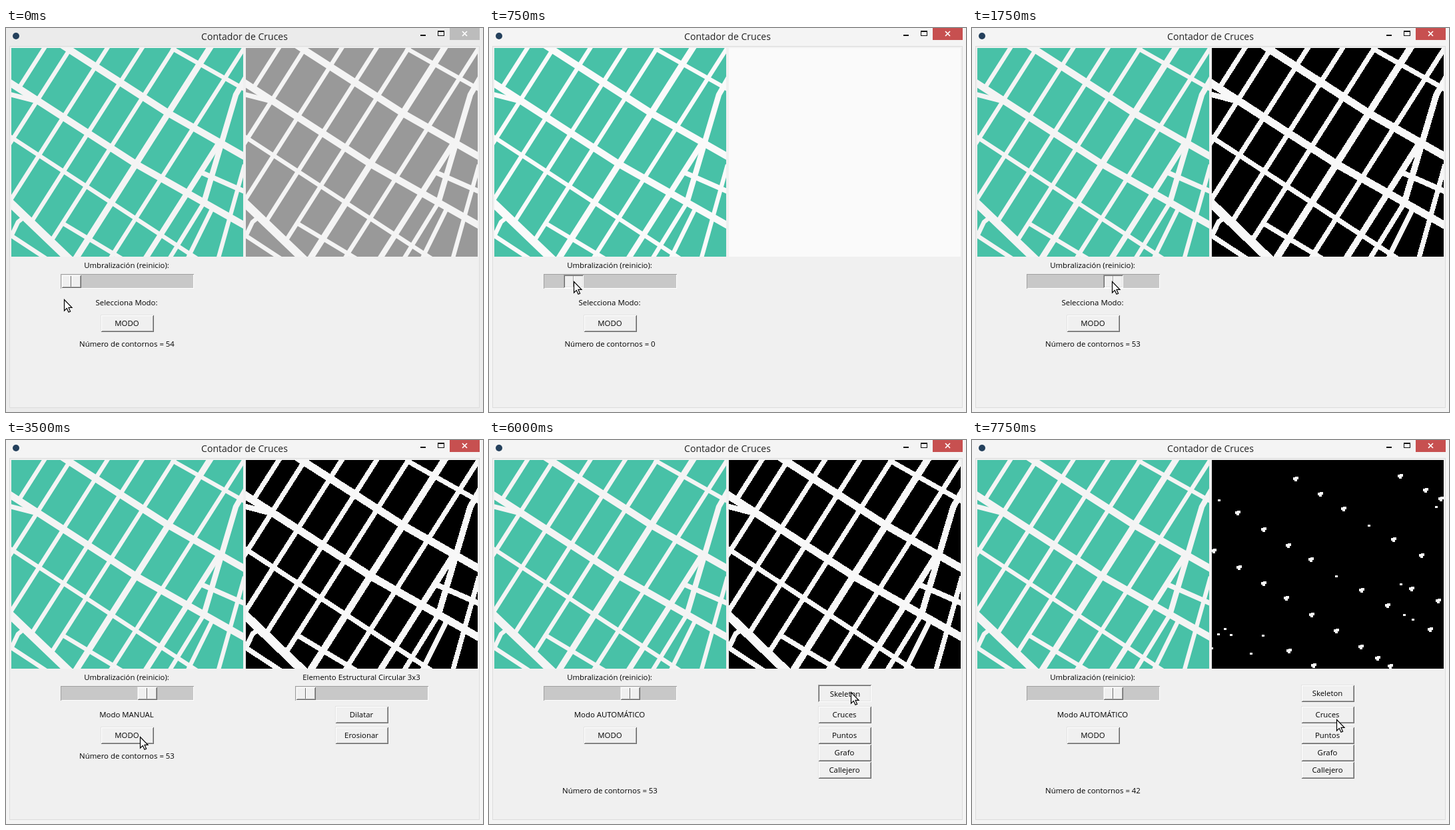
Write an HTML page with a canvas that moves like this. It is 716 px wide and 576 px high and loops after 8 s.

```html
<!DOCTYPE html>
<html lang="es">
<head>
<meta charset="utf-8">
<title>Contador de Cruces</title>
<style>
html, body { margin: 0; width: 100%; height: 100%; overflow: hidden; background: #f0f0f0; }
canvas { display: block; width: 716px; height: 576px; }
</style>
</head>
<body>
<canvas id="stage" width="716" height="576"></canvas>
<script>
const ctx = document.getElementById('stage').getContext('2d');
const LOOP = 8000, TICK = 250;
const MAP = { x: 8, y: 30, w: 348, h: 313 };
const FONT = '"Open Sans", "Noto Sans", sans-serif';

const road = (width, ...points) => ({ width, points });

// The streets are parallel lines hung on the middle avenue.
const avenueY = x => 204 + (x - 195) * (x < 195 ? 0.645 : 0.565);
function street(x, width = 8, bottom = 348, top = 24) {
  const at = y => [x - 0.637 * (y - avenueY(x)), y];
  return road(width, at(top), at(bottom));
}

const roads = [
  road(12, [82, 24], [244, 128], [360, 194]),
  road(12, [2, avenueY(2)], [195, 204], [360, avenueY(360)]),
  road(8, [2, 160], [290, 348]),
  road(8, [248, 30], [360, 93]),
  road(14, [2, 258], [97, 349]),
  road(8, [4, 309], [62, 347]),
  road(8, [87, 294], [174, 346]),
  road(9, [294, 217], [360, 246]),
  road(9, [4, 99], [47, 110]),
  road(8, [28, 283], [18, 291], [8, 312]),
  road(10, [360, 74], [345, 100], [297, 262]),
  road(8, [358, 205], [318, 348]),
  road(8, [297, 262], [244, 348]),
  road(8, [310, 270], [272, 347]),
  street(19, 8, 89), street(47), street(86), street(123, 8, 290),
  street(157, 8, 320), street(195, 11), street(233), street(272, 10, 348, 173)
];
const segments = roads.flatMap(({ points }) => points.slice(1).map((p, i) => [points[i], p]));

function layer(bg, paint) {
  const c = document.createElement('canvas');
  c.width = MAP.w;
  c.height = MAP.h;
  const g = c.getContext('2d');
  g.fillStyle = bg;
  g.fillRect(0, 0, MAP.w, MAP.h);
  g.translate(-MAP.x, -MAP.y);
  paint(g);
  return c;
}

function drawRoads(g, color, extra) {
  g.strokeStyle = color;
  g.lineJoin = 'round';
  for (const { width, points } of roads) {
    g.lineWidth = width + extra;
    g.beginPath();
    for (const [x, y] of points) g.lineTo(x, y);
    g.stroke();
  }
}

const softMap = (bg, color) => layer(bg, g => {
  g.filter = 'blur(0.7px)';
  drawRoads(g, color, -1.6);
});

const binaryMap = extra => layer('#000', g => {
  drawRoads(g, '#fff', extra);
  const img = g.getImageData(0, 0, MAP.w, MAP.h), d = img.data;
  for (let i = 0; i < d.length; i += 4) d[i] = d[i + 1] = d[i + 2] = d[i] > 127 ? 248 : 0;
  g.putImageData(img, 0, 0);
});

const skeletonMap = () => layer('#000', g => {
  g.beginPath();
  g.rect(MAP.x + 2, MAP.y + 2, MAP.w - 4, MAP.h - 3);
  g.clip();
  g.fillStyle = '#f4f4f4';
  for (const [[ax, ay], [bx, by]] of segments) {
    const n = Math.ceil(Math.max(Math.abs(bx - ax), Math.abs(by - ay)));
    for (let k = 0; k <= n; k++)
      g.fillRect(Math.round(ax + (bx - ax) * k / n), Math.round(ay + (by - ay) * k / n), 1, 1);
  }
});

// Crossing of two segments; room is the distance to the nearest segment end.
function crossing([a, b], [c, d]) {
  const ux = b[0] - a[0], uy = b[1] - a[1], vx = d[0] - c[0], vy = d[1] - c[1];
  const det = ux * vy - uy * vx;
  if (Math.abs(det) < 1) return null;
  const wx = c[0] - a[0], wy = c[1] - a[1];
  const s = (wx * vy - wy * vx) / det, t = (wx * uy - wy * ux) / det;
  const room = Math.min(
    Math.min(s, 1 - s) * Math.hypot(ux, uy),
    Math.min(t, 1 - t) * Math.hypot(vx, vy));
  return { x: a[0] + ux * s, y: a[1] + uy * s, room };
}

function findCrossings() {
  const hits = segments.flatMap((s, i) => segments.slice(i + 1).map(r => crossing(s, r)))
    .filter(p => p && p.room > -5 && p.x > MAP.x && p.x < MAP.x + MAP.w - 3 &&
      p.y > MAP.y + 3 && p.y < MAP.y + MAP.h - 3)
    .sort((p, q) => q.room - p.room);
  const kept = [];
  for (const p of hits)
    if (kept.every(q => Math.hypot(p.x - q.x, p.y - q.y) > 7)) kept.push(p);
  return kept;
}

const crossMap = () => layer('#000', g => {
  g.fillStyle = '#f8f8f8';
  for (const p of findCrossings()) {
    const x = Math.round(p.x), y = Math.round(p.y);
    if (p.room < 7) {
      g.fillRect(x - 2, y - 1, 4, 3);
    } else {
      g.fillRect(x - 4, y - 2, 5, 4);
      g.fillRect(x - 1, y - 3, 5, 4);
      g.fillRect(x - 2, y + 1, 4, 3);
    }
  }
});

const maps = {
  teal: softMap('#48c1a7', '#f4f4f4'),
  tealBright: softMap('#48c1a7', '#fafafa'),
  gray: softMap('#999', '#f4f4f4'),
  blank: layer('#fafafa', () => {}),
  wide: binaryMap(1),
  binary: binaryMap(-0.6),
  skeleton: skeletonMap(),
  crosses: crossMap()
};

const within = (t, a, b) => t >= a && t < b;
const progress = (t, a, b) => Math.min(1, Math.max(0, (t - a) / (b - a)));
const lerp = (a, b, k) => Math.round(a + (b - a) * k);
const dragEase = t => 1 - (1 - progress(t, 750, 1750)) ** 2.5;

// Pointer moves: start, end, destination.
const moves = [
  [0, 250, 94, 378], [500, 750, 127, 380], [2000, 2500, 201, 445], [4250, 4500, 223, 475],
  [4500, 4750, 620, 455], [4750, 5000, 598, 392], [5000, 5250, 543, 378], [6500, 7000, 547, 419]
];
function pointer(t) {
  let x = 87, y = 407;
  for (const [a, b, tx, ty] of moves) {
    if (a === 2000) x = lerp(x, 210, dragEase(t));
    const k = progress(t, a, b);
    x = lerp(x, tx, k);
    y = lerp(y, ty, k);
  }
  return [x, y];
}

const views = [
  [0, 'gray', 54], [750, 'blank', 0], [1500, 'wide', 54],
  [1750, 'binary', 53], [6250, 'skeleton', 1014], [7750, 'crosses', 42]
];

function box(x, y, w, h, color) {
  ctx.fillStyle = color;
  ctx.fillRect(x, y, w, h);
}

function label(str, x, y, size = 11.4, color = '#000') {
  ctx.font = `${size}px ${FONT}`;
  ctx.textAlign = 'center';
  ctx.fillStyle = color;
  ctx.fillText(str, x, y);
}

function bevel(x, y, w, h, down) {
  const dark = '#696969', mid = '#a0a0a0';
  const [outer, inner, farInner, farOuter] = down
    ? [mid, dark, '#e3e3e3', '#fff']
    : ['#e3e3e3', '#fff', mid, dark];
  box(x, y, w, h, outer);
  box(x + 1, y + 1, w - 1, h - 1, farOuter);
  box(x + 1, y + 1, w - 2, h - 2, inner);
  box(x + 2, y + 2, w - 3, h - 3, farInner);
  box(x + 2, y + 2, w - 4, h - 4, '#f0f0f0');
}

function button(str, x, y, down = false) {
  const d = down ? 1 : 0;
  bevel(x, y, 80, 26, down);
  label(str, x + 39.5 + d, y + 17 + d);
}

function slider(x, thumb, down = false) {
  box(x, 369, 200, 22, '#a0a0a0');
  box(x + 1, 370, 199, 21, '#fff');
  box(x + 1, 370, 198, 20, '#c8c8c8');
  bevel(thumb, 370, 30, 20, down);
  box(thumb + 14, 372, 1, 16, down ? '#a0a0a0' : '#696969');
  box(thumb + 15, 372, 1, 16, '#fff');
}

function frame(active) {
  const bar = active ? '#f4f4f4' : '#ebebeb';
  box(0, 0, 716, 576, bar);
  box(5, 27, 706, 543, '#dcdcdc');
  box(6, 28, 704, 541, '#f0f0f0');
  ctx.fillStyle = '#24405c';
  ctx.beginPath();
  ctx.arc(15, 12, 5, 0, 7);
  ctx.fill();
  label('Contador de Cruces', 358, 18, 14.06, '#222');
  box(622, 10, 8, 2, '#111');
  box(648, 4, 10, 8, '#111');
  box(649, 6, 8, 5, bar);
  box(666, 0, 45, 18, active ? '#c75050' : '#bcbcbc');
  ctx.strokeStyle = '#fff';
  ctx.lineWidth = 1.7;
  ctx.stroke(new Path2D('M685 5L692 12M692 5L685 12'));
}

const arrow = new Path2D('M.5 .5V17L4.3 13.4L7 19.3L9.6 18.2L7 12.4H12Z');
function cursor(x, y) {
  ctx.save();
  ctx.translate(x, y);
  ctx.fillStyle = '#fff';
  ctx.strokeStyle = '#000';
  ctx.lineWidth = 1.2;
  ctx.fill(arrow);
  ctx.stroke(arrow);
  ctx.restore();
}

function draw(t) {
  const [, view, count] = views.findLast(v => v[0] <= t);
  const manual = within(t, 3000, 4000), auto = t >= 4000;
  const mode = auto ? 'Modo AUTOMÁTICO' : manual ? 'Modo MANUAL' : 'Selecciona Modo:';
  const thumb = t < 750 ? 83 : lerp(112, 197, dragEase(t));

  frame(t >= 500);
  ctx.drawImage(within(t, 500, 1500) ? maps.tealBright : maps.teal, MAP.x, MAP.y);
  ctx.drawImage(maps[view], MAP.x + 352, MAP.y);

  label('Umbralización (reinicio):', 181, 360);
  slider(82, thumb, within(t, 500, 2250));
  label(mode, 181, 416);
  button('MODO', 142, 430, within(t, 2750, 3000));
  label('Número de contornos = ' + count, 181.5, auto ? 530 : 478);

  if (manual) {
    label('Elemento Estructural Circular 3x3', 533.5, 360);
    slider(434, 435);
    button('Dilatar', 494, 399);
    button('Erosionar', 494, 430);
  }
  if (auto) {
    button('Skeleton', 494, 367, within(t, 6000, 6250));
    button('Cruces', 494, 399, within(t, 7500, 7750));
    ['Puntos', 'Grafo', 'Callejero'].forEach((name, i) => button(name, 494, 430 + 26 * i));
  }
  cursor(...pointer(t));
}

const start = performance.now();
function tick() {
  const t = (performance.now() - start) % LOOP;
  draw(Math.floor(t / TICK) * TICK);
  requestAnimationFrame(tick);
}
tick();
</script>
</body>
</html>
```
